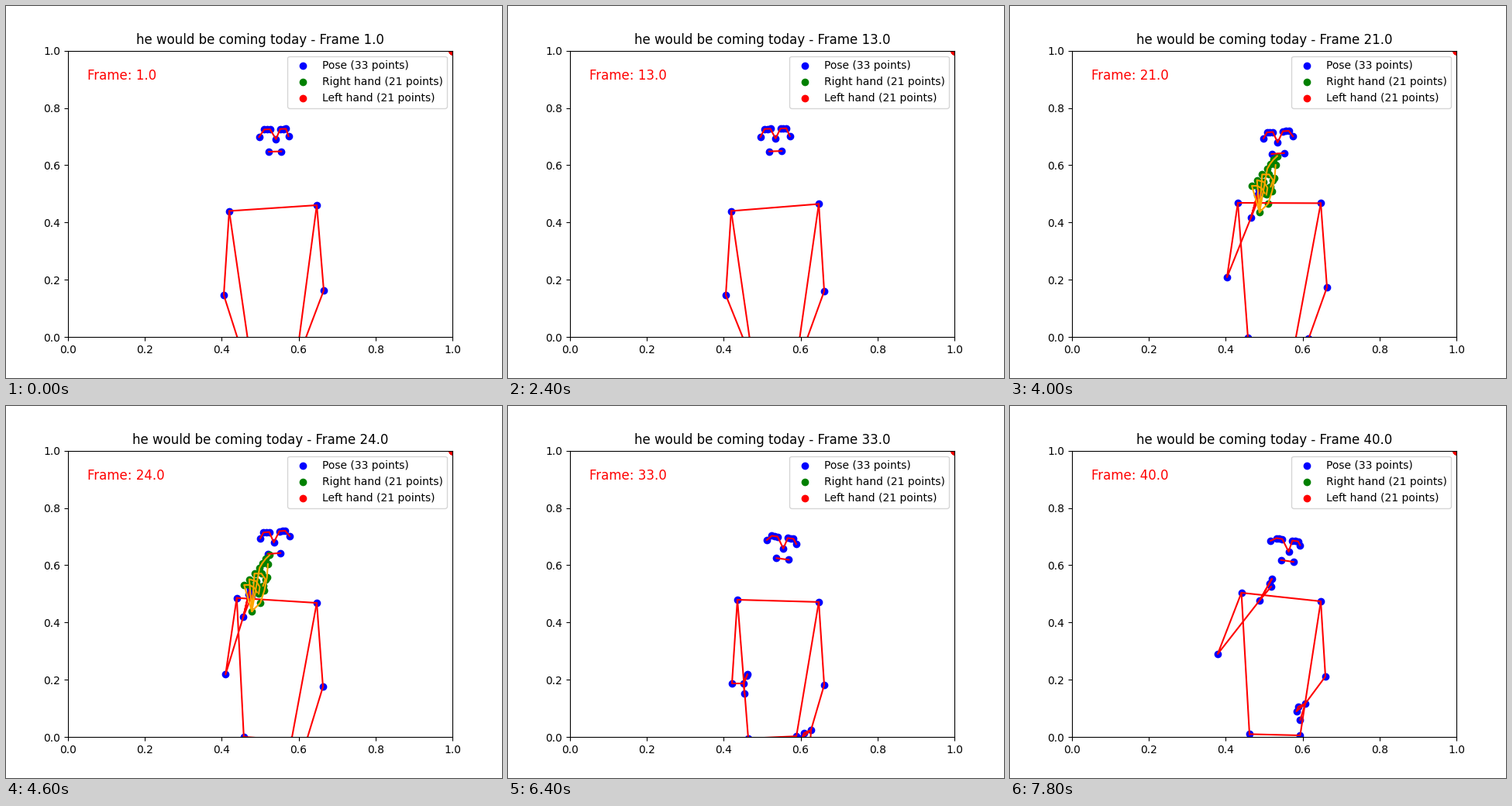
A matplotlib script that plays this animation: 640 px wide and 480 px high, repeating every 8000 ms.

```python
import numpy as np
import matplotlib.pyplot as plt
from matplotlib.animation import FuncAnimation

COUNT = 40


def path(n, *keys):
    """Smooth curve through (time, value, ...) keys, held before and after."""
    keys = np.array(keys, float)
    times, values = keys[:, 0], keys[:, 1:]
    slopes = np.gradient(values, times, axis=0)
    n = np.clip(n, times[0], times[-1])
    i = min(np.searchsorted(times, n, side="right") - 1, len(times) - 2)
    span = times[i + 1] - times[i]
    t = (n - times[i]) / span
    return ((1 + 2 * t) * (1 - t) ** 2 * values[i]
            + t * (1 - t) ** 2 * span * slopes[i]
            + t * t * (3 - 2 * t) * values[i + 1]
            + t * t * (t - 1) * span * slopes[i + 1])


def head(n):
    """Ears, eyes, nose and mouth of a head that shifts, turns, nods and tilts."""
    cx, cy, yaw, nod, tilt = path(
        n, (1, 345.5, 168.5, 2.9, 3.4, -0.03), (13, 344.7, 168.5, 0.6, 2.5, -0.03),
        (21, 346.1, 169.5, -0.8, 6.5, -0.07), (28, 349, 170, -1.5, 7, -0.05),
        (33, 353, 175.5, 2.3, 8.5, 0.14), (40, 355.3, 176.7, 4.2, 11.3, 0.15))

    def at(dx, turn, dy, lean):
        return [cx + dx + turn * yaw, cy + dy + lean * nod + tilt * dx]

    ears = [at(s * 19, 0, 0, 0) for s in (-1, 1)]
    eyes = [at(dx, 0.6, -12, 0.7) for dx in (-14, -10.4, -6.5, 6.5, 10.4, 14)]
    lips = [at(s * 8, 0.6, 17.6, 0.5) for s in (-1, 1)]
    return np.array([ears[0], *eyes[:3], at(0, 1, 0, 1), *eyes[3:], ears[1]]), np.array(lips)


def near_arm(n):
    shoulder = path(n, (13, 288, 264.5), (21, 294, 254), (28, 301, 242),
                    (33, 296, 250), (40, 298.6, 241))
    elbow = path(n, (13, 281, 373), (21, 280, 350), (28, 288, 347),
                 (33, 289, 358), (40, 268, 320))
    wrist = path(n, (1, 312, 470), (13, 316, 460), (21, 311, 273),
                 (28, 301, 306), (33, 304, 358), (40, 322, 251))
    reach = path(n, (13, 9, 25), (21, 10, -36), (28, 6, -25), (33, 5, -12), (40, 16, -28))
    thumb = path(n, (13, 8, 18), (21, 13, -33), (28, 6.4, -8), (33, 1, 13), (40, 15, -18))
    return shoulder, elbow, wrist, wrist + 0.8 * reach, wrist + reach, wrist + thumb


def far_arm(n):
    shoulder = path(n, (1, 401, 257), (40, 401, 252))
    elbow = path(n, (1, 410, 367), (13, 408, 368), (21, 409, 363),
                 (33, 408, 360), (40, 407, 349))
    wrist = path(n, (13, 374, 462), (21, 385.4, 429), (28, 388.5, 440),
                 (33, 391, 418), (40, 381, 384))
    thumb = path(n, (33, -1, 17), (40, -6.6, 21))
    return shoulder, elbow, wrist, wrist + (-9, 4), wrist + (-11.4, 10), wrist + thumb


def hips(n):
    return (path(n, (13, 313.4, 440), (21, 307, 428), (33, 310, 429), (40, 309, 423.4)),
            path(n, (1, 376.8, 440), (13, 374.7, 440), (21, 367.7, 434),
                 (28, 370.4, 428), (40, 374.4, 425)))


def finger(base, heading, bend, length):
    """Four joints that curl by the same angle at each step."""
    angle = np.radians(heading + bend * np.arange(3))
    steps = length * np.column_stack([np.cos(angle), np.sin(angle)])
    return np.vstack([base, base + np.cumsum(steps, axis=0)])


def make_hand():
    """Palm root and five fingers relative to the wrist."""
    curls = [(-60, 8, 7), (0, 55, 9), (15, 42, 9), (0, 30, 7)]
    fingers = [finger(np.array([22, -18]), -72, -7, 17)]
    for k, curl in enumerate(curls):
        knuckle = np.array([21, -63]) + k / 3 * np.array([-20, 22])
        fingers.append(finger(knuckle, *curl))
    return np.vstack([[11, -7], *fingers])


HAND = make_hand()
HAND_CHAINS = [[0, *range(k, k + 4)] for k in range(1, 21, 4)]
AWAY = np.ones((21, 2))  # an unseen hand collapses into the corner


def to_axes(points):
    return (np.array(points) - (80, 427.2)) / (496, -369.6)


def pose(n):
    """All pose dots, the chains that join them, and the near wrist."""
    face, lips = head(n)
    near, far, hip = near_arm(n), far_arm(n), hips(n)
    chains = [face, lips, [hip[0], near[0], far[0], hip[1], hip[0]]]
    for shoulder, elbow, wrist, pinky, index, thumb in (near, far):
        chains.append([shoulder, elbow, wrist, pinky, index, wrist, thumb])
    dots = np.vstack([face, lips, near, far, hip])
    return to_axes(dots), [to_axes(c) for c in chains], near[2]


fig, ax = plt.subplots(figsize=(6.4, 4.8), dpi=100)
ax.set_xlim(0, 1)
ax.set_ylim(0, 1)
title = ax.set_title("")
label = ax.text(0.05, 0.9, "", fontsize=12, color="red")

pose_dots = ax.scatter([], [], color="blue", label="Pose (33 points)")
right_dots = ax.scatter([], [], color="green", label="Right hand (21 points)")
ax.scatter(*AWAY.T, color="red", label="Left hand (21 points)")
pose_lines = [ax.plot([], [], color="red")[0] for _ in range(5)]
hand_lines = [ax.plot([], [], color="orange")[0] for _ in HAND_CHAINS]
ax.legend(loc="upper right")


def draw(i):
    n = i + 1
    dots, chains, wrist = pose(n)
    seen = 20 <= n <= 25 or 35 <= n <= 38
    hand = to_axes(wrist + HAND) if seen else AWAY
    pose_dots.set_offsets(dots)
    right_dots.set_offsets(hand)
    for line, chain in zip(pose_lines, chains):
        line.set_data(*chain.T)
    for line, chain in zip(hand_lines, HAND_CHAINS):
        line.set_data(*hand[chain].T)
    title.set_text(f"he would be coming today - Frame {n:.1f}")
    label.set_text(f"Frame: {n:.1f}")
    return []


anim = FuncAnimation(fig, draw, frames=COUNT, interval=200, repeat=True,
                     repeat_delay=0, init_func=lambda: draw(0))
plt.show()
```
